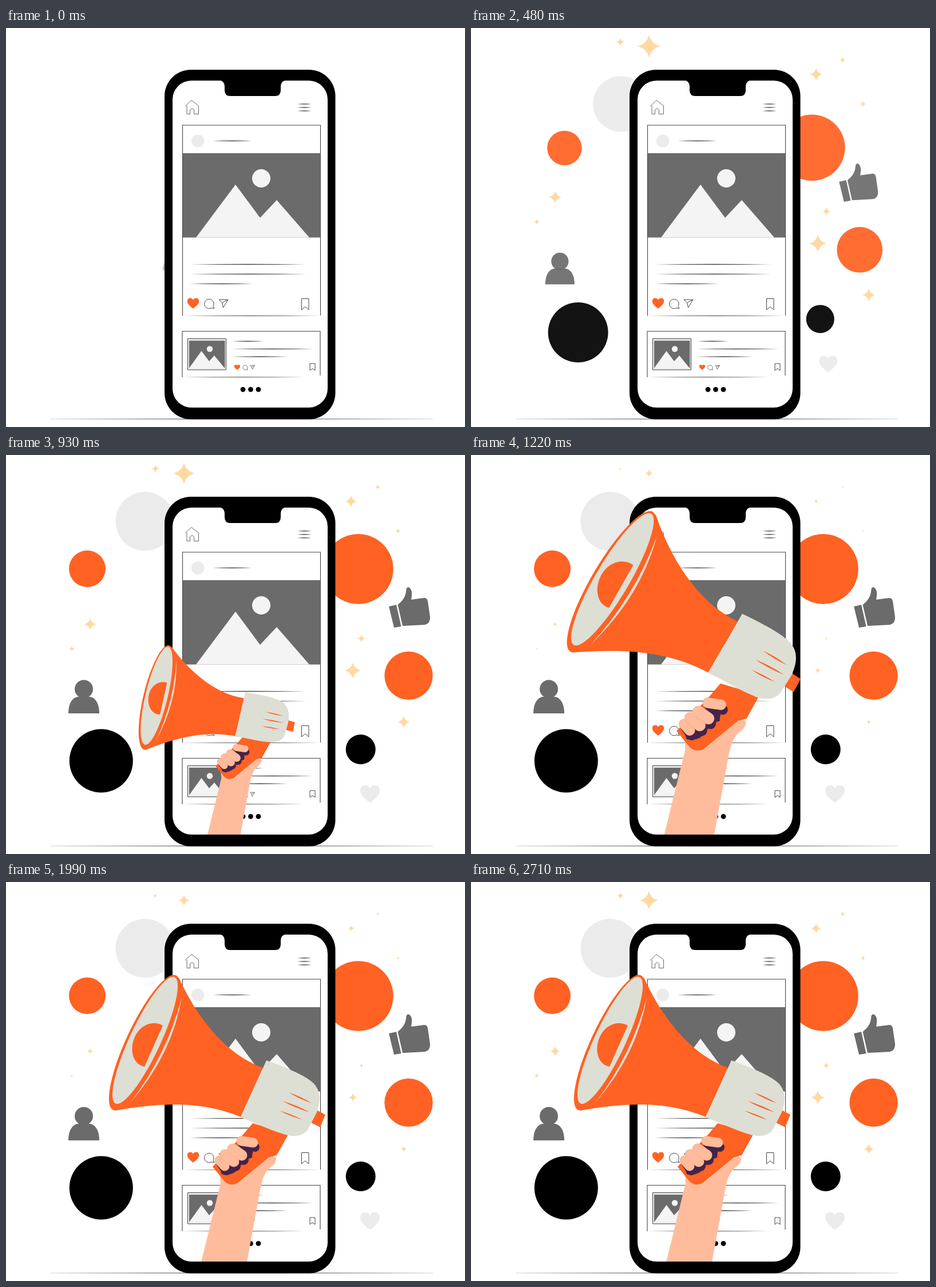
Animation, 802 px wide and 698 px high, one loop 2740 ms. Source, as an HTML page with a canvas:

```html
<!DOCTYPE html>
<html lang="en">
<head>
<meta charset="utf-8">
<title>Social media campaign</title>
<style>
  html, body { margin: 0; width: 100%; height: 100%; overflow: hidden; background: #fff; }
  canvas { display: block; width: 802px; height: 698px; }
</style>
</head>
<body>
<canvas id="stage" width="802" height="698"></canvas>
<script>
const ctx = document.getElementById('stage').getContext('2d');
const LOOP = 2740;
const ORANGE = '#ff6223', GREY = '#6b6b6b', PALE = '#ebebeb', INK = '#444';
const SKIN = '#ffbc9c', CLAY = '#dddfd5', PLUM = '#44234a', SPARK = '#ffd9a2';

const clamp01 = v => Math.min(1, Math.max(0, v));
const outBack = q => 1 + 2.62 * (q - 1) ** 3 + 1.62 * (q - 1) ** 2;

function fill(d, color) {
  ctx.fillStyle = color;
  ctx.fill(new Path2D(d));
}
function line(d, width = 1, color = INK) {
  ctx.strokeStyle = color;
  ctx.lineWidth = width;
  ctx.stroke(new Path2D(d));
}
function disc(x, y, r, color) {
  ctx.fillStyle = color;
  ctx.beginPath();
  ctx.arc(x, y, r, 0, Math.PI * 2);
  ctx.fill();
}
function oval(x, y, rx, ry, degrees, color) {
  ctx.fillStyle = color;
  ctx.beginPath();
  ctx.ellipse(x, y, rx, ry, degrees * Math.PI / 180, 0, Math.PI * 2);
  ctx.fill();
}
function box(x, y, w, h, radii, color) {
  ctx.fillStyle = color;
  ctx.beginPath();
  ctx.roundRect(x, y, w, h, radii);
  ctx.fill();
}
function placed(x, y, scale, draw) {
  ctx.save();
  ctx.translate(x, y);
  ctx.scale(scale, scale);
  draw();
  ctx.restore();
}
// Hand-drawn stroke: thick in the middle, thin at the ends.
function taper(x1, x2, y, weight = 1.5, color = INK) {
  const mid = (x1 + x2) / 2;
  fill(`M${x1},${y}Q${mid},${y - weight} ${x2},${y}Q${mid},${y + weight} ${x1},${y}Z`, color);
}
function heart(x, y, width, color) {
  placed(x, y, width, () => fill(`M0,.45C-.2,.28 -.5,.08 -.5,-.18C-.5,-.36 -.38,-.45 -.25,-.45
    C-.14,-.45 -.05,-.4 0,-.29C.05,-.4 .14,-.45 .25,-.45C.38,-.45 .5,-.36 .5,-.18
    C.5,.08 .2,.28 0,.45Z`, color));
}

// Sparkles: x, y, radius
const sparkles = [
  [311, 32, 20], [261, 24, 7], [603, 81, 11], [649.5, 56, 5], [685, 133, 5],
  [147, 296, 11], [115, 339, 5], [621, 321, 7], [606, 377, 15], [695, 467, 11]
];
function sparkleScale(t) {
  if (t < 860) return 1 - (1 - clamp01((t - 30) / 420)) ** 2;
  return 0.65 + 0.35 * Math.cos((t - 860) / 850 * Math.PI * 2);
}
function drawSparkles(t) {
  const s = sparkleScale(t);
  for (const [x, y, r] of sparkles) {
    placed(x, y, r * s, () => fill('M0,-1Q.19,-.19 1,0Q.19,.19 0,1Q-.19,.19 -1,0Q-.19,-.19 0,-1Z', SPARK));
  }
}

const badge = (r, color) => () => disc(0, 0, r, color);
function person() {
  fill('M-27,29C-27,8 -17,0 -10,0H10C17,0 27,8 27,29Z', GREY);
  disc(0, -13.5, 16, GREY);
}
function thumbUp() {
  fill('M-36,-1L-23,-4L-14.5,34L-27,36Z', GREY);
  fill(`M-20.5,-4L-14,-10Q-7,-18 -6,-27L-5.5,-32Q-3,-37 1,-33Q5,-28 4,-20L3,-13L26,-16
    Q31,-16 32,-10L36,18Q36,29 27,31L-12,33Z`, GREY);
}
// Badges: resting point, launch point, picture
const badges = [
  [243, 116, 496, 343, badge(51.5, PALE)],
  [142, 199, 429, 346, badge(32, ORANGE)],
  [615.5, 199.5, 349, 332, badge(61.2, ORANGE)],
  [703.5, 386, 377, 413, badge(42.2, ORANGE)],
  [166.3, 535, 446, 502, badge(55.5, '#000')],
  [619.7, 515, 492, 435, badge(26, '#000')],
  [136, 423, 396, 396, person],
  [705, 266, 332, 319, thumbUp],
  [636, 593, 476, 526, () => heart(0, 0, 34, PALE)]
];
function drawBadges(t) {
  const p = 1 - 0.59 * (1 - clamp01(t / 746)) ** 2;
  ctx.globalAlpha = p;
  for (const [x, y, fromX, fromY, draw] of badges) {
    placed(fromX + (x - fromX) * p, fromY + (y - fromY) * p, 0.27 + 0.73 * p, draw);
  }
  ctx.globalAlpha = 1;
}

function reactions(x, y, s) {
  heart(x, y, 20.5 * s, ORANGE);
  placed(x, y, s, () => {
    const w = 1 / Math.sqrt(s);
    line('M32,8A8.2,8.2 0 1 1 35,5L37,9Z', w);
    line('M45,-6.5H61L52.5,7.5L50.5,-1ZM50.5,-1L61,-6.5', w);
  });
}
function bookmark(x, y, w, h) {
  line(`M${x},${y}h${w}v${h}l${-w / 2},${-h * 0.27}l${-w / 2},${h * 0.27}Z`);
}
function drawPhone() {
  line('M78,684H746', 0.5, '#aaa');
  taper(78, 746, 684, 1.6, '#777');
  box(277, 73, 298.5, 611.5, 46, '#000');
  box(291, 92, 271, 572, 33, '#fff');
  fill('M371,91Q382,92 382,103V109Q382,119 392,119H470Q480,119 480,109V103Q480,92 491,91Z', '#000');

  line('M316,136V150.5H321.5V143Q325,139 328.5,143V150.5H336.5V136L324,126.5L313,137', 0.8);
  for (const y of [133, 139, 145]) taper(509, 534, y);

  line('M549.5,503V170H308.5V503.5', 1.1);
  taper(308, 549, 503.5, 1);
  disc(335.2, 197.6, 11.2, PALE);
  taper(361, 430, 197.6);
  ctx.fillStyle = GREY;
  ctx.fillRect(309, 219, 240.5, 147.5);
  disc(446, 263, 16, '#f4f4f4');
  fill('M332,366.5L401,274L444,332L473,301L530,366.5Z', '#f4f4f4');
  taper(321, 525, 413.5);
  taper(321, 525, 430.5);
  taper(321, 433, 447.5);
  reactions(327, 481.7, 1);
  bookmark(516.5, 473.5, 12.5, 19.5);

  line('M549,608V530.5H308V611', 1.1);
  taper(308, 521, 610.7, 1);
  ctx.fillStyle = PALE;
  ctx.fillRect(317.5, 543.5, 67, 54.5);
  line('M317.5,543.5H384.5V598H317.5Z');
  ctx.fillStyle = GREY;
  ctx.fillRect(320, 547, 62.5, 48);
  disc(356, 561.5, 5.2, '#f4f4f4');
  fill('M320,595L341.5,565L355,583L364,573L382,595Z', '#f4f4f4');
  taper(395, 450, 548);
  taper(394, 538, 561.5);
  taper(394, 493, 575);
  reactions(404, 593.5, 0.5);
  bookmark(531, 587, 9, 12);
  for (const x of [414, 427.5, 441]) disc(x, 632.3, 4.4, '#000');
}

function drawArm() {
  fill(`M341,665L375,527Q374,510 370,497L400,505L450,478L459,483Q467,477 472,483
    Q473,492 461,500C447,514 446,530 441,555L421,665Z`, SKIN);
}
function drawHandle() {
  fill('M431,422L414,442L361,498L382,524Q392,533 404,527L459,482L473,478L494,440Z', ORANGE);
}
function drawHorn() {
  fill('M543,399L558,407L549,429L533,421Z', ORANGE);
  oval(242, 281, 32, 130, 25, ORANGE);
  fill('M302,167C330,230 380,300 449,325L410,411C340,382 270,386 190,400Z', ORANGE);
  oval(243, 277, 27, 122, 25, CLAY);
  fill('M274,251C256,241 232,250 223,276C216,297 223,320 242,323Z', ORANGE);
  fill('M307,202Q291,300 218,385Q281,302 307,202Z', CLAY);
  fill(`M455,312C490,325 520,337 535,350C552,365 549,385 543,403L528,432
    C520,445 503,447 485,441C455,432 435,420 410,412Z`, CLAY);
  for (const [x, y, w, h] of [[494, 368, 40, 19], [483, 383, 48, 20], [478, 400, 40, 16]]) {
    fill(`M${x},${y}q${w * 0.55},${h * 0.4} ${w},${h}q${-w * 0.55},${-h * 0.4} ${-w},${-h}Z`, ORANGE);
  }
}
// Fingers: knuckle, tip, thickness
const fingers = [
  [373, 487, 382, 497, 16], [383, 477, 398, 489, 18],
  [396, 467, 412, 478, 18], [411, 453, 432, 456, 16]
];
function drawFingers() {
  ctx.lineCap = 'round';
  for (const [x, y, tipX, tipY, w] of fingers) {
    line(`M${x + 2},${y + 4}L${tipX + 3},${tipY + 8}`, w, PLUM);
  }
  fill('M440,458Q430,466 430,482Q414,486 408,500Q395,516 377,511L372,495L412,462Z', PLUM);
  for (const [x, y, tipX, tipY, w] of fingers) {
    line(`M${x},${y}L${tipX},${tipY}`, w + 1, '#f0a584');
    line(`M${x},${y}L${tipX},${tipY}`, w, SKIN);
  }
  ctx.lineCap = 'butt';
}
// The hand grows from the bottom of the screen while the horn tips up on its handle.
function drawCall(t) {
  const q = clamp01((t - 770) / 763);
  if (q === 0) return;
  const s = outBack(q);
  const tilt = (s - 1) * (s < 1 ? 41.6 : 60) * Math.PI / 180;
  ctx.save();
  ctx.beginPath();
  ctx.rect(0, 0, 802, 664);
  ctx.clip();
  ctx.translate(380, 664);
  ctx.scale(s, s);
  ctx.translate(-380, -664);
  drawArm();
  drawHandle();
  ctx.save();
  ctx.translate(480, 425);
  ctx.rotate(tilt);
  ctx.translate(-480, -425);
  drawHorn();
  ctx.restore();
  drawFingers();
  ctx.restore();
}

function render(now) {
  const t = now % LOOP;
  ctx.fillStyle = '#fff';
  ctx.fillRect(0, 0, 802, 698);
  drawSparkles(t);
  drawBadges(t);
  drawPhone();
  drawCall(t);
}
const start = performance.now();
function tick() {
  render(performance.now() - start);
  requestAnimationFrame(tick);
}
tick();
</script>
</body>
</html>
```
